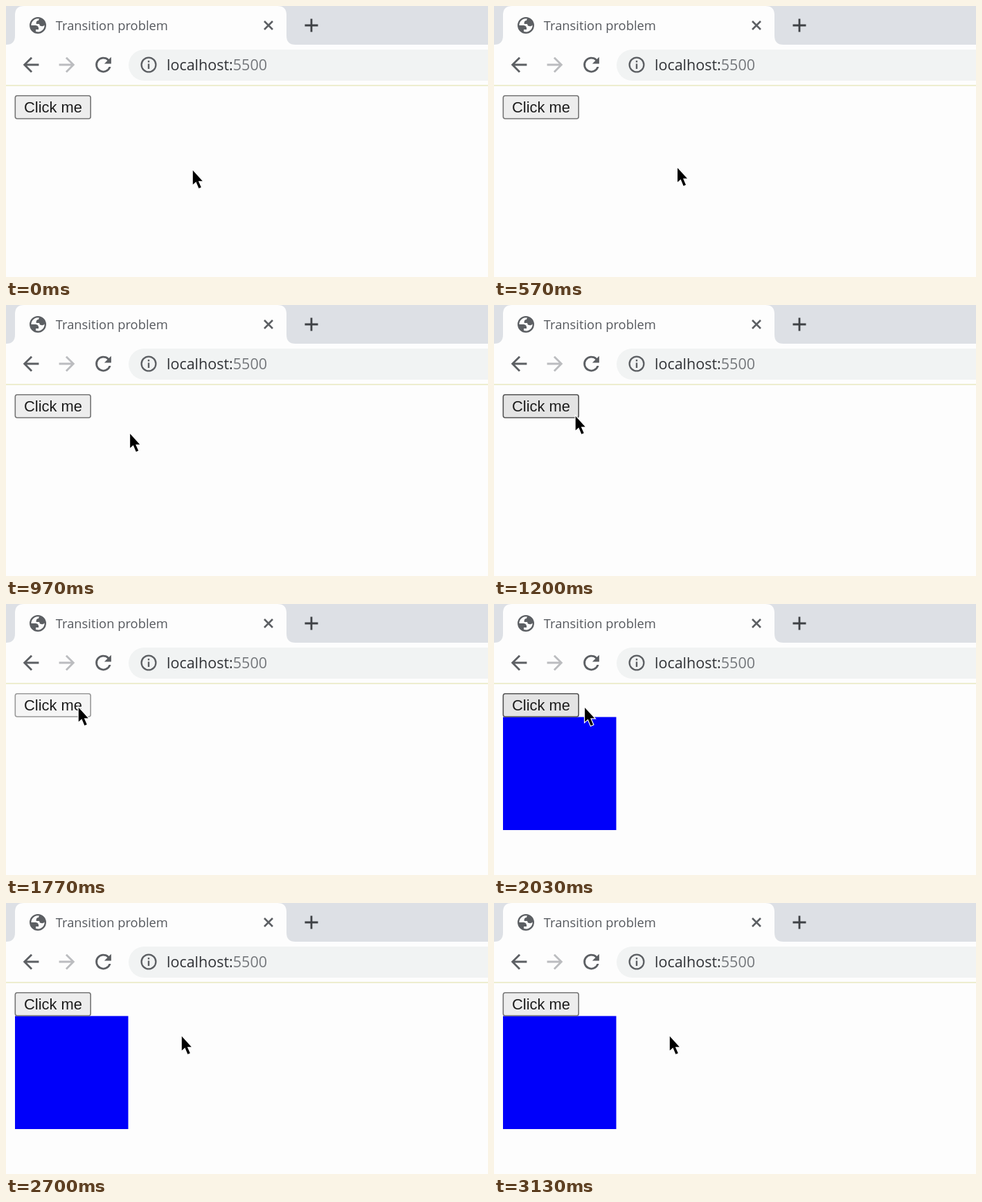
These frames come from a looping animation (696x392 px, 3260 ms). An HTML page:

```html
<!DOCTYPE html>
<html lang="en">
<head>
<meta charset="utf-8">
<title>Transition problem</title>
<style>
  html, body { margin: 0; width: 100%; height: 100%; overflow: hidden; background: #fdfdfd; }
  svg { display: block; }
  .ui { font-family: "Open Sans", "Noto Sans", sans-serif; }
  .icon { fill: #5c5f63; }
  .line { fill: none; stroke: #5c5f63; }
  #button rect { fill: #ededed; stroke: #767676; stroke-width: 1.6; }
  #button.hover rect { fill: #e4e4e4; stroke: #555; }
  #button.active rect { fill: #f5f5f5; stroke: #999; }
  #button text { font: 21.9px "Liberation Sans", Arial, sans-serif; fill: #1c1c1c; }
</style>
</head>
<body>
<svg width="696" height="392" viewBox="0 0 696 392">
  <defs>
    <path id="arrow" d="M20 11H7.83l5.59-5.59L12 4l-8 8 8 8 1.41-1.41L7.83 13H20z"/>
  </defs>

  <!-- tab strip -->
  <rect width="696" height="56" fill="#dde0e5"/>
  <path d="M0 56Q13 56 13 43V13Q13 0 26 0H392Q405 0 405 13V43Q405 56 418 56Z" fill="#fdfdfd"/>
  <path class="icon" fill-rule="evenodd" transform="translate(31.6 13.6) scale(1.2)" d="M12 2a10 10 0 1 0 0 20 10 10 0 0 0 0-20zM4 12h4.4c3.4 0 4.9 1.7 4.5 5.1H9.5v2.5a8 8 0 0 0 10.5-8.1c-.7 1-1.7 1.5-3 1.5-2.1 0-3.2-.9-3.2-2.75h-3.75c-.3-2.7.7-4.1 2.9-4.1 0-1 .3-1.6.8-2A8 8 0 0 0 4 12z"/>
  <text class="ui" x="71.8" y="34.5" font-size="18.35" fill="#55585d">Transition problem</text>
  <path class="line" d="M373 22l12 12m0-12l-12 12" stroke-width="2.6"/>
  <path d="M431.5 28h19M441 18.5v19" stroke="#3e4145" stroke-width="2.8"/>

  <!-- toolbar -->
  <use class="icon" href="#arrow" transform="translate(19 68) scale(1.42)"/>
  <use href="#arrow" transform="translate(105 68) scale(-1.42 1.42)" fill="#bbbcbf"/>
  <path class="icon" transform="translate(123.5 68) scale(1.42)" d="M17.65 6.35A8 8 0 1 0 19.73 14h-2.08A6 6 0 1 1 16.22 7.78L13 11h7V4z"/>
  <rect x="177" y="63" width="560" height="45" rx="22.5" fill="#f1f3f3"/>
  <circle class="line" cx="206" cy="85" r="10.4" stroke-width="2.3"/>
  <path class="line" d="M206 79v2.6M206 83.6v7.4" stroke-width="2.4"/>
  <text class="ui" x="232" y="93" font-size="21.5" fill="#303236">localhost:<tspan fill="#74777b">5500</tspan></text>
  <path d="M0 115H696" stroke="#eeeecf" stroke-width="1.8"/>

  <!-- page -->
  <rect id="square" x="13" y="163.5" width="163.5" height="163.5" fill="#0000fa"/>
  <g id="button">
    <rect x="13.3" y="129.8" width="108.9" height="33.2" rx="3"/>
    <text x="26" y="154">Click me</text>
  </g>
  <path id="cursor" d="M.8 .8V21.3L5.4 17.3L9.4 26.8L12.8 25.3L8.8 16.2H14.8Z" fill="#000" stroke="#fdfdfd" stroke-width="2.4" paint-order="stroke"/>
</svg>
<script>
const LOOP = 3260;
const PRESS = 1630, RELEASE = 1800;
const HOVER_START = 1170, HOVER_END = 2065;

// Cursor tip: [ms, x, y]
const path = [
  [0, 269, 237], [550, 269, 237], [730, 228, 206], [1070, 158, 177],
  [1200, 117, 160], [1330, 109, 153], [1600, 104, 149], [2000, 104, 149],
  [2030, 130, 149], [2330, 240, 184], [2530, 256, 191], [2700, 253, 192], [LOOP, 253, 192]
];
const [square, button, cursor] = ["square", "button", "cursor"].map(id => document.getElementById(id));

function cursorAt(t) {
  const i = path.findIndex(p => p[0] > t);
  const [t0, x0, y0] = path[i - 1], [t1, x1, y1] = path[i];
  const k = (t - t0) / (t1 - t0);
  return [x0 + (x1 - x0) * k, y0 + (y1 - y0) * k];
}

function buttonState(t) {
  if (t >= PRESS && t < RELEASE) return "active";
  return t >= HOVER_START && t < HOVER_END ? "hover" : "";
}

function draw() {
  const t = performance.now() % LOOP;
  cursor.setAttribute("transform", `translate(${cursorAt(t)})`);
  button.setAttribute("class", buttonState(t));
  square.style.visibility = t >= RELEASE ? "visible" : "hidden";
  requestAnimationFrame(draw);
}
draw();
</script>
</body>
</html>
```
